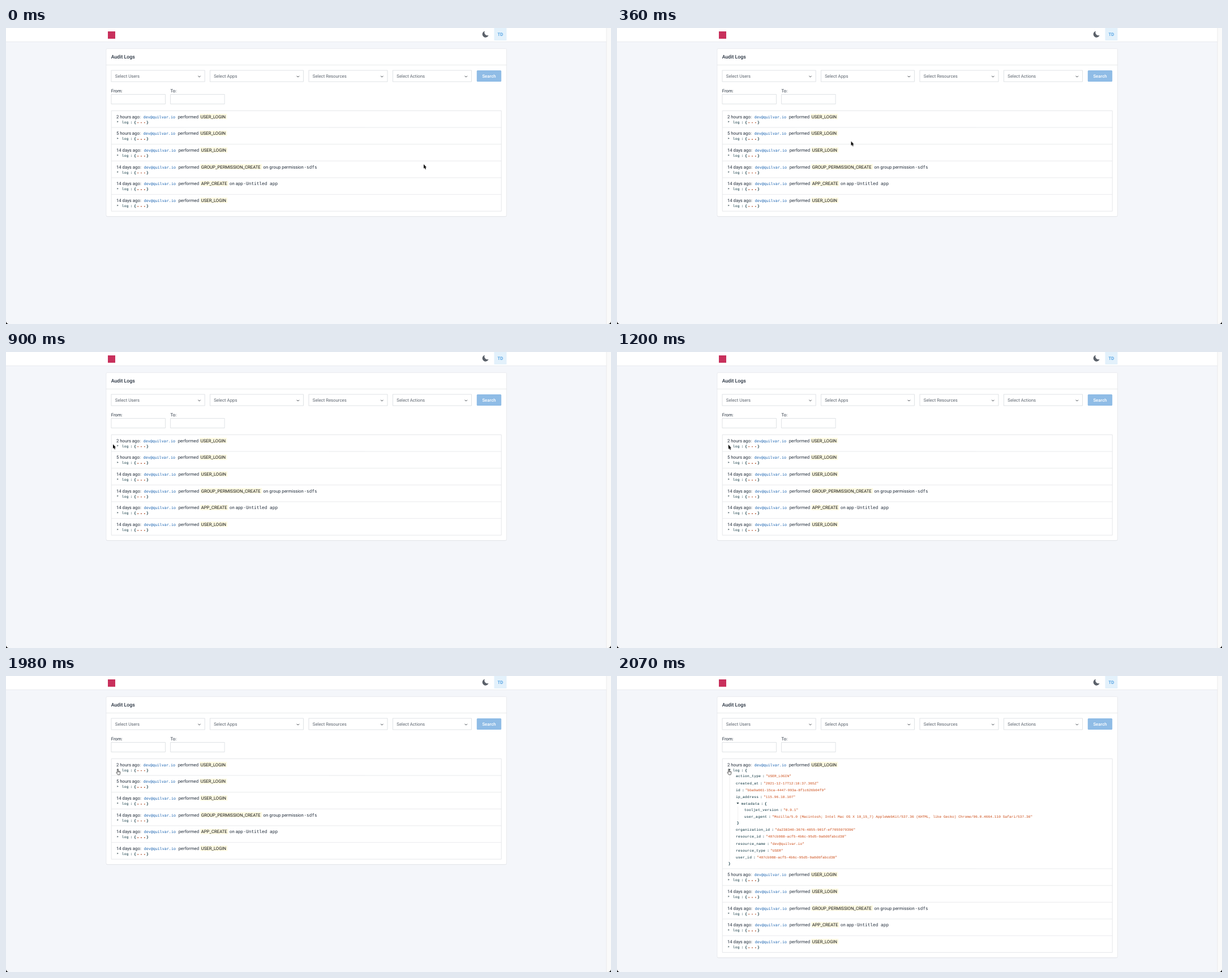
Recreate the animation shown at these times as an HTML page. Size 1069 by 524 pixels, loop 3.6 s.

```html
<!DOCTYPE html>
<html lang="en">
<head>
<meta charset="utf-8">
<title>Audit Logs</title>
<style>
  html, body { margin: 0; width: 100%; height: 100%; overflow: hidden; background: #f4f6fa; }
  svg { display: block; width: 100vw; height: 100vh; }
  text { font: 7.8px Roboto, sans-serif; fill: #232e3c; white-space: pre; text-rendering: geometricPrecision; }
  .title { font-size: 8.75px; font-weight: 500; }
  .hint { fill: #5c646e; }
  .btn { font-weight: 500; fill: #fff; text-anchor: middle; }
  .avatar { font-weight: 500; fill: #4299e1; text-anchor: middle; }
  .mail { font: 6.68px "DejaVu Sans Mono", monospace; fill: #1862b0; }
  .name { font: 7.76px "DejaVu Sans Mono", monospace; }
  .mark { font-size: 7.74px; fill: #0c0f14; }
  .key, .str, .punct { font: 6.24px "Liberation Mono", monospace; fill: #002b36; }
  .key { letter-spacing: .28px; }
  .str { fill: #cb4b16; }
  .punct { font-weight: 700; }
</style>
</head>
<body>
<svg id="stage" viewBox="0 0 1069 524" xmlns="http://www.w3.org/2000/svg"></svg>
<script>
const LOOP = 3600, STEP = 30, HAND_AT = 1410, OPEN_AT = 2040, GROW = 165.1;
const MAIL = 'dev@quilvar.io';
const stage = document.getElementById('stage');

function add(parent, tag, attrs = {}, content) {
  const el = document.createElementNS('http://www.w3.org/2000/svg', tag);
  for (const k in attrs) el.setAttribute(k, attrs[k]);
  if (content) el.textContent = content;
  parent.appendChild(el);
  return el;
}
const group = (parent = stage) => add(parent, 'g');
const text = (p, x, y, s, cls = '') => add(p, 'text', { x, y, class: cls }, s);
const rect = (p, x, y, width, height, fill, more) => add(p, 'rect', { x, y, width, height, fill, ...more });
const path = (p, d, fill, more) => add(p, 'path', { d, fill, ...more });
const box = (p, x, y, w, h, stroke = '#d8dbdf') => rect(p, x, y, w, h, '#fff', { stroke, 'stroke-width': .8 });
const rule = (p, x1, y1, x2, y2, stroke = '#e3e5e8') => path(p, `M${x1} ${y1}L${x2} ${y2}`, 'none', { stroke, 'stroke-width': .8 });

// Page frame and header
rect(stage, 0, 0, 1069, 524, '#f4f6fa');
rect(stage, 0, 0, 1061, 24.3, '#fff');
rule(stage, 0, 24.4, 1061, 24.4, '#e5e7eb');
rect(stage, 1061, 0, 8, 524, '#fafafa');
rule(stage, 1061, 0, 1061, 524, '#e8e8e8');
rect(stage, 180, 6, 13, 13, '#c8305c');
path(stage, 'M846 5.6a5.6 5.6 0 1 0 6.6 7.2 5.2 5.2 0 0 1-6.6-7.2z', '#5a6069');
rect(stage, 862.5, 0, 22, 22, '#e3f1fb');
text(stage, 873.5, 14.1, 'TD', 'avatar');

// Card and filters
const shade = rect(stage, 177, 37.2, 707.4, 297, '#dfe2e7', { rx: 2 });
const card = rect(stage, 177, 36.5, 707.4, 297, '#fff', { rx: 2, stroke: '#e4e6ea', 'stroke-width': .7 });
rule(stage, 177, 65.5, 884.4, 65.5);
text(stage, 185.7, 53.6, 'Audit Logs', 'title');

for (const [label, x, w] of [['Users', 186, 165.2], ['Apps', 360.4, 165.2], ['Resources', 535, 139], ['Actions', 683.5, 139]]) {
  box(stage, x, 75, w, 20);
  text(stage, x + 6.8, 87.8, 'Select ' + label, 'hint');
  path(stage, `M${x + w - 11.8} 84.8l2.1 2.1 2.1-2.1`, 'none', { stroke: '#3a3f46', 'stroke-width': 1 });
}
rect(stage, 831.8, 75, 43.4, 20, '#8fbce6', { rx: 1.5 });
text(stage, 853.5, 87.8, 'Search', 'btn');
for (const [label, x] of [['From:', 185.8], ['To:', 290.5]]) {
  text(stage, x, 114.4, label);
  box(stage, x + .2, 117.6, 95.4, 16.9);
}

// Log list
const list = box(stage, 186.2, 146.6, 689, 177.6, '#dfe2e5');
const first = group(), rest = group();

function colon(p, x, y) { text(p, x + 2.9, y, ':', 'punct'); }
function key(p, x, y, name) {
  text(p, x, y, name, 'key');
  const end = x + name.length * 4.02;
  colon(p, end, y);
  return end;
}
function folded(p, y) {
  path(p, `M196.4 ${y - 4.4}l2.4 1.4-2.4 1.4z`, '#4d6066');
  key(p, 204.8, y, 'log');
  text(p, 226.2, y, '{', 'punct');
  for (const x of [233.2, 239, 244.8]) add(p, 'circle', { cx: x, cy: y - 1.3, r: .85, fill: '#a8401a' });
  text(p, 247.9, y, '}', 'punct');
}
function entry(p, y, ago, action, markW, on, name, nameX) {
  const x = ago.startsWith('14') ? 1 : 0;
  text(p, 194.9, y, ago + ' ago:');
  text(p, 242.7 + x, y, MAIL, 'mail');
  text(p, 303.7 + x, y, 'performed');
  rect(p, 342.3 + x, y - 7.7, markW, 9.6, '#fffbe3');
  text(p, 343.7 + x, y, action, 'mark');
  if (on) {
    text(p, 344.6 + x + markW, y, on);
    text(p, nameX, y, name, 'name');
  }
}

const entries = [
  ['2 hours', 'USER_LOGIN', 48],
  ['5 hours', 'USER_LOGIN', 48],
  ['14 days', 'USER_LOGIN', 48],
  ['14 days', 'GROUP_PERMISSION_CREATE', 109, 'on group permission -', 'sdfs', 531],
  ['14 days', 'APP_CREATE', 49.4, 'on app -', 'Untitled app', 424.1],
  ['14 days', 'USER_LOGIN', 48]
];
const closed = group(first), open = group(first);
entries.forEach((e, i) => {
  const y = 159.6 + i * 29.66, p = i ? rest : first;
  if (i) rule(p, 186.2, y - 13.2, 875.2, y - 13.2);
  entry(p, y, ...e);
  folded(i ? p : closed, y + 9.2);
});

// Unfolded log
const fields = [
  [210, 179.3, 'action_type', 'USER_LOGIN'],
  [210, 191.5, 'created_at', '2021-12-17T12:18:37.365Z'],
  [210, 203.7, 'id', 'bba9a661-15ca-4447-993a-8f1c626b04f9'],
  [210, 215.9, 'ip_address', '115.96.18.107'],
  [225, 239, 'tooljet_version', '0.9.1'],
  [225, 251.2, 'user_agent', 'Mozilla/5.0 (Macintosh; Intel Mac OS X 10_15_7) AppleWebKit/537.36 (KHTML, like Gecko) Chrome/96.0.4664.110 Safari/537.36'],
  [210, 274.1, 'organization_id', 'da238340-3676-4855-901f-ef7055979396'],
  [210, 286.3, 'resource_id', '407cb988-acf5-4b6c-95d5-9a0d6fabcd38'],
  [210, 298.5, 'resource_name', MAIL],
  [210, 310.8, 'resource_type', 'USER'],
  [210, 323, 'user_id', '407cb988-acf5-4b6c-95d5-9a0d6fabcd38']
];
for (const [x, y, name, value] of fields) text(open, key(open, x, y, name) + 8.8, y, `"${value}"`, 'str');
for (const [x, y, name] of [[204.8, 168.8, 'log'], [219.5, 228, 'metadata']]) {
  text(open, key(open, x, y, name) + 9.3, y, '{', 'punct');
  path(open, `M${x - 8.2} ${y - 4}h4.2l-2.1 2.9z`, '#33484f');
}
rule(open, 199, 172, 199, 327, '#ebebeb');
rule(open, 213.7, 231, 213.7, 256, '#ebebeb');
text(open, 211.7, 262.2, '}', 'punct');
text(open, 196.7, 334, '}', 'punct');

// Dark window corners
path(stage, 'M0 519.5V524H4.5Q.6 523.4 0 519.5zM1069 519.5V524H1064.5Q1068.4 523.4 1069 519.5z', '#000');

// Pointers
const arrow = group();
path(arrow, 'M0 0V7.4L1.7 5.9 2.9 8.8 4.2 8.2 3 5.5H5.2z', '#000', { stroke: '#fff', 'stroke-width': .7, 'paint-order': 'stroke' });
const hand = group();
hand.setAttribute('transform', 'translate(194.6 164.4)');
path(hand, 'M2.2 6.4V1.2a.8.8 0 0 1 1.6 0V4.2l2.6.6q1 .3.9 1.4l-.4 2.2-.6 1.8H2.9L.6 7q-.5-.9.3-1.2.6-.1 1.3.6z', '#fff', { stroke: '#111', 'stroke-width': .75, 'stroke-linejoin': 'round' });
path(hand, 'M3.8 4.2V6M5 4.6V6.1M6.1 4.8V6.2', 'none', { stroke: '#111', 'stroke-width': .5 });

// Time, x, y, then the start and end slope of the way to the next point
const route = [
  [0, 738, 241.3, 0, 2],
  [180, 694, 232, .34, 0],
  [540, 177, 174, 1, 0],
  [600, 175.3, 172, 0, 0],
  [660, 175.3, 172, 0, 1],
  [900, 189, 163.4, 1, 0],
  [1110, 196.3, 164, 0, 0],
  [1200, 196.9, 164.4, 0, 0],
  [LOOP, 196.9, 164.4, 0, 0]
];
function place(t) {
  const i = route.findIndex((p, n) => t < route[n + 1][0]);
  const [t0, x0, y0, a, b] = route[i], [t1, x1, y1] = route[i + 1];
  const u = (t - t0) / (t1 - t0), u2 = u * u, u3 = u2 * u;
  const k = a * (u3 - 2 * u2 + u) + b * (u3 - u2) + 3 * u2 - 2 * u3;
  return `translate(${x0 + (x1 - x0) * k}px, ${y0 + (y1 - y0) * k}px)`;
}

const timing = { duration: LOOP, iterations: Infinity };
function flip(el, prop, before, after, at) {
  el.animate([
    { [prop]: before, offset: 0, easing: 'step-end' },
    { [prop]: after, offset: at / LOOP, easing: 'step-end' },
    { [prop]: after, offset: 1 }
  ], timing);
}

const stops = [];
for (let t = 0; t < LOOP; t += STEP) stops.push({ transform: place(t), offset: t / LOOP, easing: 'step-end' });
stops.push({ transform: place(LOOP - STEP), offset: 1 });
arrow.animate(stops, timing);

flip(arrow, 'opacity', 1, 0, HAND_AT);
flip(hand, 'opacity', 0, 1, HAND_AT);
flip(closed, 'opacity', 1, 0, OPEN_AT);
flip(open, 'opacity', 0, 1, OPEN_AT);
flip(rest, 'transform', 'translate(0px, 0px)', `translate(0px, ${GROW}px)`, OPEN_AT);
for (const el of [shade, card, list]) {
  const h = +el.getAttribute('height');
  flip(el, 'height', h + 'px', h + GROW + 'px', OPEN_AT);
}
</script>
</body>
</html>
```
